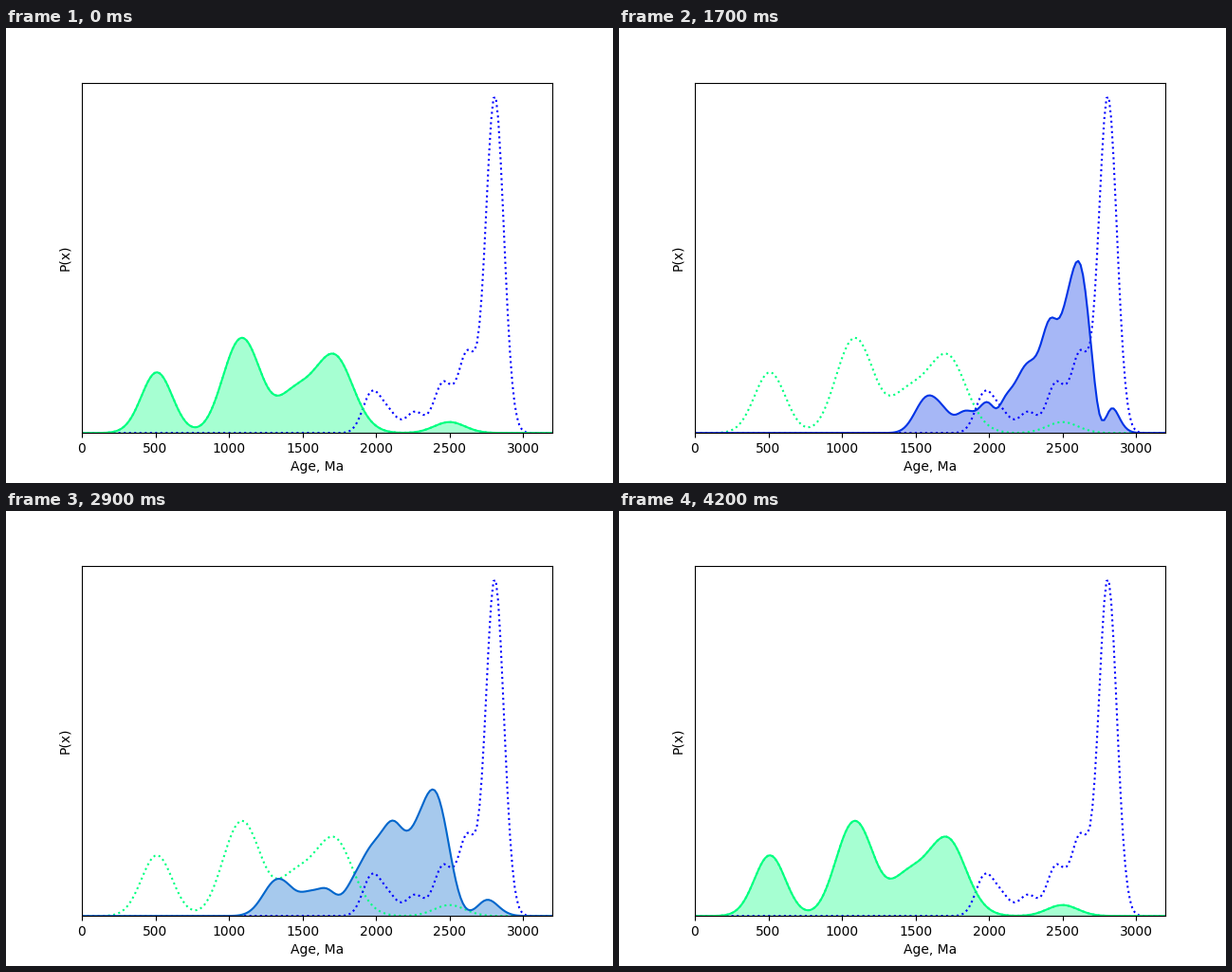
A matplotlib script for the animation above (4300 ms loop, 640x480 px).

```python
import numpy as np
import matplotlib.pyplot as plt
from matplotlib.animation import FuncAnimation

HALF = 21
X_MAX = 3199

# Age clusters as (centre, height); each sample has a single bandwidth.
YOUNG = [(510, 64), (1028, 59), (1148, 59), (1425, 36), (1600, 36),
         (1740, 62), (1880, 9), (2500, 11.5)]
OLD = [(1970, 41), (2085, 20), (2265, 22), (2455, 52), (2620, 83), (2808, 356)]

ages = np.linspace(0, X_MAX, 201)
fine = np.arange(0, X_MAX + 1.0)


def bell(x, width):
    return np.exp(-(x / width) ** 2 / 2)


def density(clusters, width):
    # The small floor keeps the cumulative curve invertible.
    return 1e-3 + sum(h * bell(fine - c, width) for c, h in clusters)


def cumulative(f):
    total = np.cumsum(f)
    return total / total[-1], total[-1]


young, old = density(YOUNG, 105), density(OLD, 61)
rank, young_mass = cumulative(young)
old_rank, old_mass = cumulative(old)
partner = np.interp(rank, old_rank, fine)


def smooth(f, width):
    kernel = bell(np.arange(-200, 201), width)
    return np.convolve(f, kernel / kernel.sum(), mode="same")


def curve(step):
    """Slide every quantile from the young sample to the old one."""
    if step == 0:
        return np.interp(ages, fine, young)
    if step == HALF:
        return np.interp(ages, fine, old)
    t = step / HALF
    # Low quantiles leave early and arrive late.
    w = t + 0.08 * (1 - rank) ** 2 * np.sin(2 * np.pi * t)
    place = (1 - w) * fine + w * partner
    mass = (1 - t) * young_mass + t * old_mass
    moved = np.gradient(np.interp(fine, place, rank * mass))
    return np.interp(ages, fine, smooth(moved, 50 * np.sin(np.pi * t)))


def shade(step):
    w = max(step - 1, 0) / (HALF - 1)
    return (0, 1 - w, 0.5 + 0.5 * w)


fig, ax = plt.subplots(figsize=(6.4, 4.8), dpi=100)
ax.set_xlim(0, X_MAX)
ax.set_ylim(0, 369.6)
ax.set_yticks([])
ax.set_xlabel("Age, Ma")
ax.set_ylabel("P(x)", labelpad=7.5)

curves = [curve(step) for step in range(HALF + 1)]
for step in (0, HALF):
    ax.plot(ages, curves[step], ":", color=shade(step), lw=1.5)
line, = ax.plot([], [], lw=1.5)
area, = ax.fill([0, 1, 1], [0, 0, 0], alpha=0.35, lw=0, zorder=1)


def update(frame):
    step = min(frame, 2 * HALF - frame)
    y = curves[step]
    line.set_data(ages, y)
    line.set_color(shade(step))
    outline = np.column_stack([ages, y])
    area.set_xy(np.vstack([[0, 0], outline, [X_MAX, 0]]))
    area.set_facecolor(shade(step))
    return line, area


anim = FuncAnimation(fig, update, frames=2 * HALF + 1, interval=100,
                     repeat=True, repeat_delay=0)
plt.show()
```
